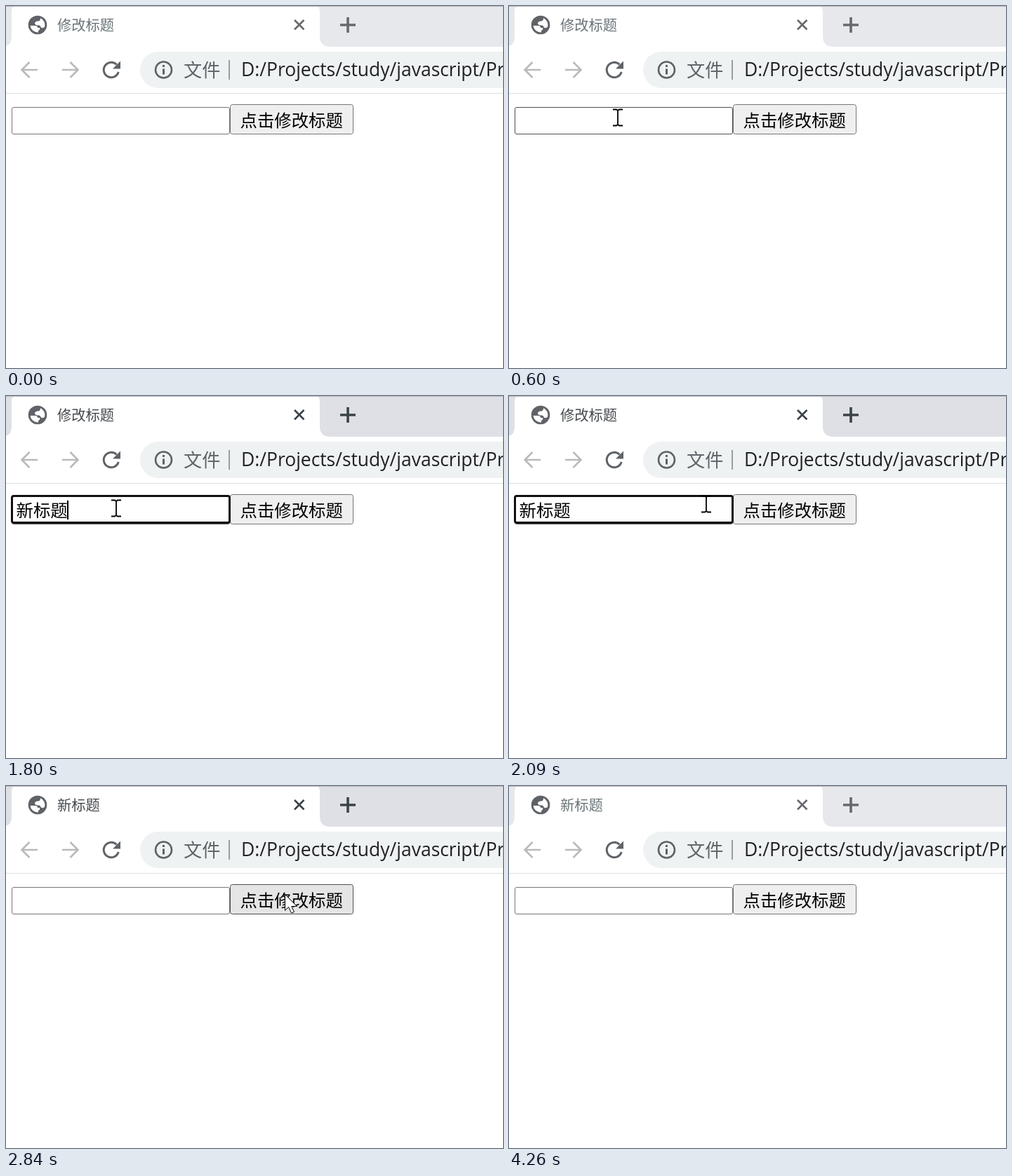
Write an HTML page that moves like this. It is 708 px wide and 516 px high and loops after 4330 ms.

```html
<!DOCTYPE html>
<html lang="zh-CN">
<head>
<meta charset="utf-8">
<title>修改标题</title>
<style>
  html, body { margin: 0; width: 100%; height: 100%; overflow: hidden; background: #fff; }
  svg { display: block; width: 708px; height: 516px; }
  text { font-family: "Noto Sans CJK SC", "Noto Sans CJK JP", "Noto Sans CJK", sans-serif; white-space: pre; }
  .icon { fill: #5f6368; }
  .line { fill: none; stroke: #5f6368; stroke-width: 2.6; }
  .faint { stroke: #bababd; }
  .bar { fill: #e7e8ec; }
  #title { font-size: 20.3px; fill: #6a7478; }
  #close, #plus { stroke: #66696d; }
  .active .bar { fill: #dee0e5; }
  .active #title { fill: #45494d; }
  .active #close, .active #plus { stroke: #3c424a; }
  .page { font-size: 24.4px; }
  .box { fill: #fff; stroke: #767676; }
  #button { fill: #efefef; }
  .box.hover { stroke: #4f4f4f; }
  #button.hover { fill: #e5e5e5; }
  #button.pressed { fill: #f5f5f5; stroke: #8d8d8d; }
</style>
</head>
<body>
<svg id="stage" viewBox="0 0 708 516">
  <path class="bar" d="M0 0H12Q8 2 8 8V43Q8 55 0 57Z"/>
  <path class="bar" d="M443 0H708V58H462Q447 58 447 43V8Q447 2 443 0Z"/>
  <rect width="708" height="1" fill="#b4b5b9"/>

  <g transform="translate(45 27)">
    <circle class="icon" r="13.3"/>
    <path fill="#fff" d="M4 -9.7Q4 -5.5 1 -5.5Q-4 -5.5 -4 -2Q-3 1 1 .5Q4 0 4.5 3Q6 5.500 10 3A10.500 10.500 0 0 0 4 -9.7Z
      M-10.500 1H-4Q0 1 0 4H3Q4 7 1 8V10.400A10.500 10.500 0 0 1 -10.500 1Z"/>
  </g>
  <text id="title" x="73" y="34.6">修改标题</text>
  <path id="close" class="line" d="M411 20l13.500 13.500m0 -13.500l-13.500 13.500"/>
  <path id="plus" class="line" style="stroke-width:3.6" d="M476 27h22m-11 -11v22"/>

  <path class="line faint" d="M45 91h-22m10.500 -11l-11 11l11 11"/>
  <path class="line faint" d="M80 91h22m-10.500 -11l11 11l-11 11"/>
  <path class="line" style="stroke-width:3" d="M157.500 83.500A10.700 10.700 0 1 0 160.200 94"/>
  <path class="icon" d="M152 89.500h11v-11z"/>
  <rect x="191" y="65" width="560" height="52" rx="26" fill="#eff2f3"/>
  <circle class="line" cx="224.500" cy="91" r="11.500"/>
  <path class="icon" d="M223 84h3v3h-3zM223 89.500h3v8h-3z"/>
  <text class="icon" x="253" y="100.700" font-size="26.200">文件</text>
  <rect x="317" y="77" width="2" height="28" fill="#9b9ea1"/>
  <text x="335" y="100" style="font:26.45px 'Open Sans',sans-serif" fill="#202124">D:/Projects/study/javascript/Pr</text>
  <rect y="124" width="708" height="1" fill="#dcdee0"/>

  <rect id="input" class="box" x="8.500" y="144.500" width="310" height="38" rx="2.500"/>
  <rect id="button" class="box" x="319.500" y="140.500" width="175" height="42" rx="3"/>
  <text class="page" x="333.500" y="172">点击修改标题</text>
  <rect id="ring" x="8.500" width="310" height="38" rx="2.500" fill="#fff" stroke="#101010" stroke-width="3"/>
  <text id="value" class="page" x="14.500" y="172">新标题</text>
  <rect id="caret" width="2" height="27"/>

  <g id="cursor">
    <path id="arrow" d="M.5 .5v23l5 -5l4 8.500l4 -1.500l-3.800 -8h7.800z" fill="#fff" stroke="#000"/>
    <path id="beam" d="M-7 -11.500h5l2 1.500l2 -1.500h5M0 -10.500v21M-7 11.500h5l2 -1.500l2 1.500h5" fill="none" stroke="#000" stroke-width="1.800"/>
  </g>
</svg>
<script>
const LOOP = 4330;
const $ = id => document.getElementById(id);
const show = (id, on) => $(id).style.display = on ? '' : 'none';

const linear = u => u;
const easeOut = u => 1 - (1 - u) ** 3;
const easeInOut = u => u * u * (3 - 2 * u);

const field = [155, 159], label = [397, 154];
const moves = [
  { start: 130, end: 640, from: [535, 489], to: field, ease: easeOut },
  { start: 1765, end: 2400, from: field, to: label, ease: easeInOut, sway: 18 },
  { start: 3505, end: 3660, from: label, to: [669, 339], ease: linear },
  { start: 3880, end: 4030, from: [690, 480], to: [708, 516], ease: linear }
];

function pointer(t) {
  const { start, end, from, to, ease, sway = 0 } = moves.findLast(m => t >= m.start) || moves[0];
  const u = ease(Math.max(0, Math.min(1, (t - start) / (end - start))));
  const [x, y] = from.map((a, i) => a + (to[i] - a) * u);
  return [x, y + sway * Math.sin(2 * Math.PI * u)];
}

function draw(t) {
  const within = (from, to) => t >= from && t < to;
  const [x, y] = pointer(t);
  const inInput = x >= 8 && x < 319 && y >= 144 && y < 183;
  const inButton = x >= 319 && x < 495 && y >= 140 && y < 183;
  const visible = within(130, 3680) || within(3880, 4030);
  const typed = within(1530, 2600);

  $('stage').classList.toggle('active', within(700, 4260));
  $('title').textContent = t < 2840 ? '修改标题' : '新标题';
  $('input').classList.toggle('hover', inInput);
  $('button').classList.toggle('hover', inButton);
  $('button').classList.toggle('pressed', within(2540, 2640));

  show('ring', within(770, 2540));
  $('ring').setAttribute('y', typed ? 142.5 : 144.5);
  show('value', typed);
  show('caret', within(770, 1300) || within(1530, 2065));
  $('caret').setAttribute('x', typed ? 87 : 15);
  $('caret').setAttribute('y', typed ? 149 : 150);

  show('cursor', visible);
  show('arrow', !inInput);
  show('beam', inInput);
  $('cursor').setAttribute('transform', `translate(${Math.round(x)} ${Math.round(y)})`);
}

const start = performance.now();
function tick() {
  draw((performance.now() - start) % LOOP);
  requestAnimationFrame(tick);
}
tick();
</script>
</body>
</html>
```
